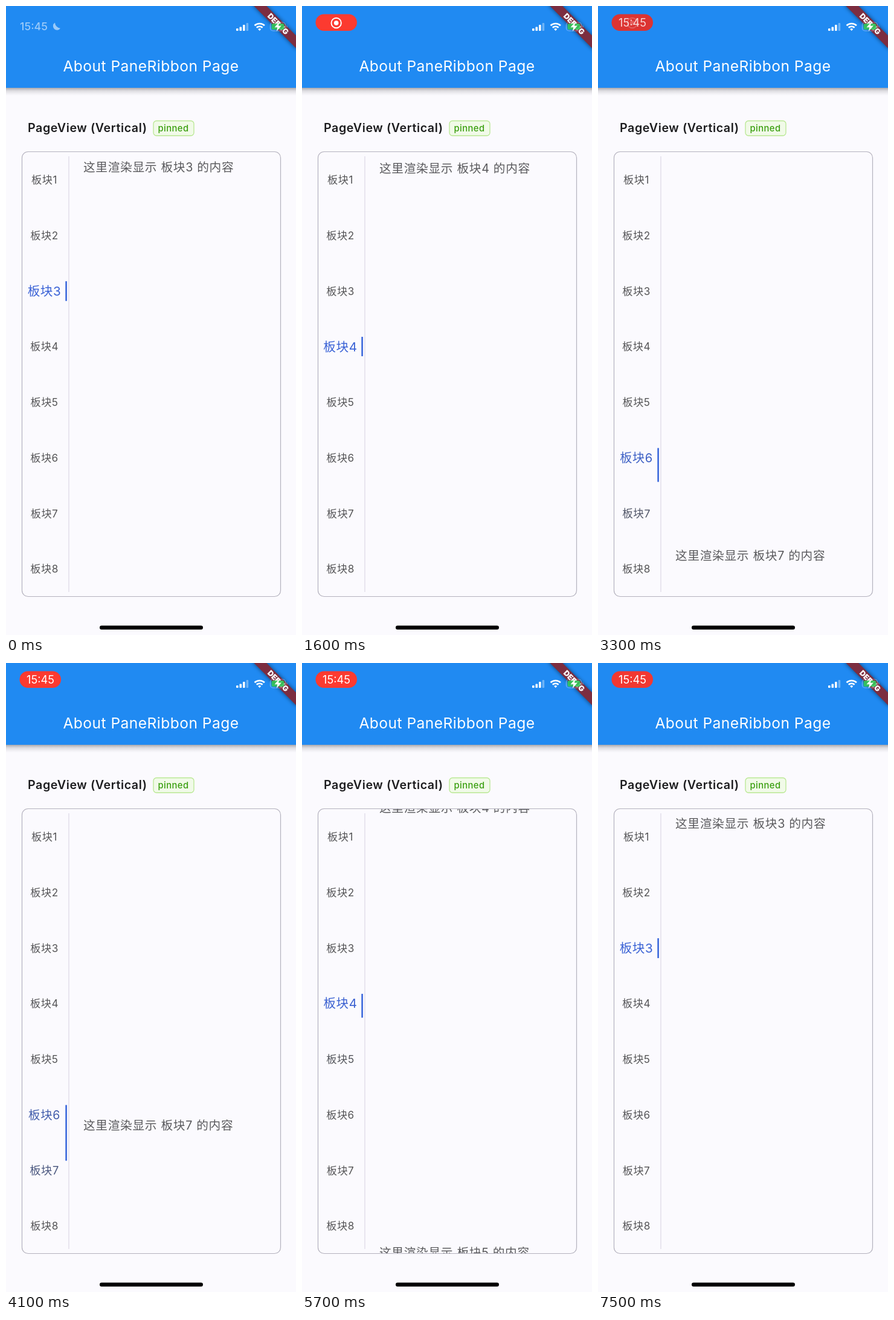
Write an HTML page that moves like this. It is 480 by 1038 pixels and loops after 7.6 s.

```html
<!DOCTYPE html>
<html lang="zh-CN">
<head>
<meta charset="utf-8">
<title>Vertical page view</title>
<style>
  html, body { margin: 0; width: 100%; height: 100%; overflow: hidden; background: #fbfafe; }
  svg { display: block; width: 100vw; height: 100vh; }
  text { font-family: Inter, "Noto Sans CJK SC", "Noto Sans CJK", sans-serif; }
  .mid { text-anchor: middle; }
  .label { font-size: 17.2px; letter-spacing: .5px; }
  .body { font-size: 19.7px; letter-spacing: .68px; fill: #5a5a5d; }
</style>
</head>
<body>
<svg viewBox="0 0 480 1038">
  <defs>
    <linearGradient id="shade" x2="0" y2="1">
      <stop offset="0" stop-color="#55555c" stop-opacity=".5"/>
      <stop offset=".4" stop-color="#77777c" stop-opacity=".22"/>
      <stop offset="1" stop-color="#a0a0a8" stop-opacity="0"/>
    </linearGradient>
    <filter id="blur" x="-20%" y="-100%" width="140%" height="300%">
      <feGaussianBlur stdDeviation="3.5"/>
    </filter>
    <clipPath id="panel"><rect x="27" y="241" width="427" height="733" rx="9"/></clipPath>
  </defs>

  <rect width="480" height="1038" fill="#fbfafe"/>
  <rect y="135" width="480" height="13" fill="url(#shade)"/>
  <rect width="480" height="135" fill="#208af2"/>
  <text class="mid" x="240" y="108" font-size="24.6" letter-spacing=".45" fill="#fff">About PaneRibbon Page</text>

  <text x="36" y="208" font-size="19.7" font-weight="600" letter-spacing=".55" fill="#1c1c1e">PageView (Vertical)</text>
  <rect x="244" y="189.500" width="67" height="24.500" rx="5" fill="#f1fae8" stroke="#b9e893" stroke-width="1.3"/>
  <text class="mid" x="277" y="206.500" font-size="14.8" font-weight="500" letter-spacing=".4" fill="#389e0d">pinned</text>

  <rect x="26.500" y="240.500" width="428" height="734" rx="10" fill="none" stroke="#b4b2be" stroke-width="1.2"/>
  <path d="M104 248V967" stroke="#dddbe6" stroke-width="1.3"/>
  <g id="pages" clip-path="url(#panel)"></g>
  <g id="labels"></g>
  <rect id="bar" x="98.300" width="2.600" fill="#3a68dc"/>
  <rect x="155" y="1022.500" width="171" height="6.500" rx="3.250" fill="#000"/>

  <g transform="translate(480 0) rotate(45)">
    <rect x="-52" y="34.500" width="104" height="14.700" fill="#000" opacity=".55" filter="url(#blur)"/>
    <rect x="-52" y="34.500" width="104" height="14.700" fill="#7c2d40"/>
    <text class="mid" x="0" y="46.300" font-size="12.5" font-weight="900" fill="#fff">DEBUG</text>
  </g>

  <g fill="#fff">
    <rect x="381" y="37" width="3.600" height="4" rx="1"/>
    <rect x="386.500" y="34.500" width="3.600" height="6.500" rx="1"/>
    <rect x="392" y="31" width="3.600" height="10" rx="1"/>
    <rect x="397.600" y="28" width="3.600" height="13" rx="1" opacity=".35"/>
  </g>
  <g fill="none" stroke="#fff" stroke-width="2.700">
    <path d="M411.500 32.300a11.800 11.800 0 0 1 16.400 0"/>
    <path d="M414.800 35.700a7.100 7.100 0 0 1 9.800 0"/>
    <path d="M417.200 38.300a3.600 3.600 0 0 1 5 0L419.700 41Z" fill="#fff" stroke="none"/>
  </g>
  <rect x="437.500" y="27" width="25" height="14" rx="4.500" fill="none" stroke="#fff" stroke-opacity=".4" stroke-width="1.200"/>
  <path d="M464.500 31.500q2.200 2.500 0 5" fill="#fff" opacity=".45"/>
  <rect x="439.500" y="29" width="21" height="10" rx="2.800" fill="#34c759" opacity=".9"/>
  <path d="M452.500 26l-8 9.300h4.800l-1.600 6.700 8-9.300h-4.800z" fill="#fff"/>

  <g id="plain" fill="#fff">
    <text class="mid" x="46" y="40.300" font-size="17.8" font-weight="500">15:45</text>
    <path d="M81 27.500a6.600 6.600 0 1 0 9 9.200a9.500 9.500 0 0 1-9-9.200z"/>
  </g>
  <g id="pill">
    <rect id="tint" x="22.500" y="13.500" width="68.500" height="27.500" rx="13.750"/>
    <g id="rec">
      <circle cx="56.700" cy="28" r="8.200" fill="none" stroke="#fff" stroke-width="1.900"/>
      <circle cx="56.700" cy="28" r="3.800" fill="#fff"/>
    </g>
    <text id="clock" class="mid" x="57" y="33.800" font-size="18.2" fill="#fff">15:45</text>
  </g>
</svg>
<script>
const LOOP = 7600, STEP = 100, MOVE = 700;
const PAGE_H = 734, TAB_H = 91.75, TAB_Y = 286.7, BAR = 32;
const REST = 3.003;
// [start ms, page reached]
const swipes = [[850, 4], [1680, 5], [2470, 6], [3215, 7],
                [3810, 6], [4503, 5], [5217, 4], [6885, REST]];

const $ = id => document.getElementById(id);
const clamp = x => Math.min(1, Math.max(0, x));
const ramp = (t, a, b) => clamp((t - a) / (b - a));
const mix = (a, b, k) => a + (b - a) * k;
const rgb = (a, b, k) => `rgb(${a.map((v, i) => Math.round(mix(v, b[i], k)))})`;
const settle = x => 1 - (1 - x ** 1.6) ** 4;

function addText(parent, cls, value) {
  const el = document.createElementNS("http://www.w3.org/2000/svg", "text");
  el.setAttribute("class", cls);
  el.textContent = value;
  return $(parent).appendChild(el);
}

const tabs = [], pages = [];
for (let n = 1; n <= 8; n++) {
  const tab = addText("labels", "label mid", "板块" + n);
  tab.setAttribute("y", 6.3);
  tabs.push(tab);
  const page = addText("pages", "body", `这里渲染显示 板块${n} 的内容`);
  page.setAttribute("x", 128);
  pages.push(page);
}

function position(t) {
  let p = REST;
  for (const [start, to] of swipes) {
    if (t < start) break;
    p = mix(p, to, settle(clamp((t - start) / MOVE)));
  }
  return p;
}

function drawPages(p) {
  pages.forEach((el, i) => el.setAttribute("y", 275.2 + PAGE_H * (i + 1 - p)));
  tabs.forEach((el, i) => {
    const k = clamp(1 - Math.abs(i + 1 - p));
    el.setAttribute("transform", `translate(63.5 ${TAB_Y + TAB_H * i}) scale(${1 + .2 * k})`);
    el.setAttribute("fill", rgb([84, 84, 86], [58, 98, 214], k));
  });
  // The leading edge runs ahead, the trailing edge catches up.
  const n = Math.floor(p), f = p - n;
  const base = TAB_Y + TAB_H * (n - 1) - BAR / 2;
  const top = base + TAB_H * clamp(2 * f - 1);
  const bottom = base + BAR + TAB_H * clamp(2 * f);
  $("bar").setAttribute("y", top);
  $("bar").setAttribute("height", bottom - top);
}

function drawStatus(t) {
  const swap = ramp(t, 3100, 3350);
  const wave = Math.max(0, Math.cos((t - 3300) / 1500 * 2 * Math.PI));
  $("plain").setAttribute("opacity", .55 * (1 - ramp(t, 0, 300)));
  $("pill").setAttribute("opacity", ramp(t, 100, 500));
  $("tint").setAttribute("fill", rgb([252, 58, 48], [220, 52, 50], t > 2400 ? wave : 0));
  $("rec").setAttribute("opacity", 1 - swap);
  $("clock").setAttribute("opacity", swap);
}

function frame(now) {
  const t = Math.floor(now % LOOP / STEP) * STEP;
  drawPages(position(t));
  drawStatus(t);
}

const begin = performance.now();
function tick() {
  frame(performance.now() - begin);
  requestAnimationFrame(tick);
}
tick();
</script>
</body>
</html>
```
